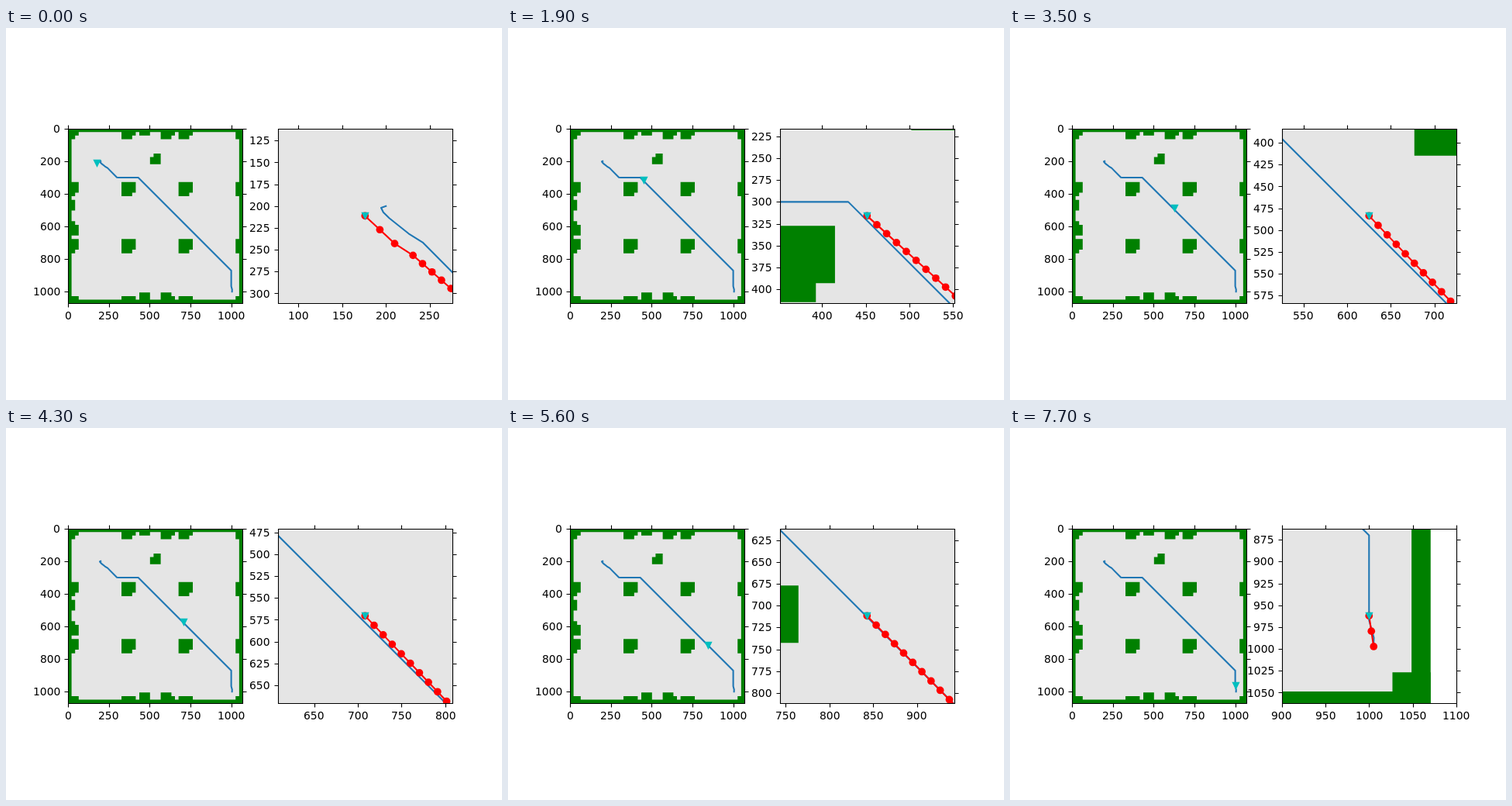
Animation of 640 by 480 pixels, one loop 7800 ms. Source, as an HTML page with a canvas:

```html
<!DOCTYPE html>
<html>
<head>
<meta charset="utf-8">
<style>
html, body { margin: 0; width: 100%; height: 100%; overflow: hidden; background: #fff; }
canvas { display: block; }
</style>
</head>
<body>
<canvas id="stage" width="640" height="480"></canvas>
<script>
const ctx = document.getElementById('stage').getContext('2d');
const SIZE = 225.45, TOP = 129.67, WORLD = 1071, CELLS = 49, CELL = WORLD / CELLS;
const STEP = 100, STEPS = 78;

// Obstacles in grid cells: x, y, width, height.
// Notched pillars repeat every 16 cells; the map wraps from bottom to top.
const blocks = [[24, 7, 2, 3], [23, 8, 3, 2], [0, 20, 2, 3], [0, 26, 2, 4], [0, 27, 3, 3]];
for (let x = -1; x < CELLS; x += 16)
  for (let y = -1; y < CELLS; y += 16)
    blocks.push([x, y, 4, 3], [x, y, 3, 4]);
for (const y of [-2, 46])
  blocks.push([20, y, 3, 4], [26, y, 3, 5], [26, y + 1, 4, 3]);

const route = [
  [200, 200], [194.5, 202], [197, 207], [204, 214], [226, 231.5], [242, 241.5],
  [299, 299], [309, 300], [430, 300], [1000, 870], [1000, 967], [1005.5, 987], [1005, 1000]
];

// Vehicle waypoints: step, x, y
const waypoints = [
  [0, 176.1, 211.2], [2, 210, 242.9], [3, 231, 256.4], [7, 274.5, 294.4],
  [9, 303, 306.5], [11, 338.8, 305.9], [17, 429, 295.6], [28, 552.6, 407.7],
  [56, 843, 711.7], [71, 1000, 871.5], [77, 1000, 962.1], [79, 1005.3, 997.2]
];

function vehicleAt(step) {
  const n = Math.max(1, waypoints.findIndex(w => w[0] >= step));
  const [a, ax, ay] = waypoints[n - 1], [b, bx, by] = waypoints[n];
  const u = (step - a) / (b - a);
  return [ax + (bx - ax) * u, ay + (by - ay) * u];
}
const track = Array.from({ length: STEPS + 2 }, (_, i) => vehicleAt(i));

// Centre of the nearest pixel, for crisp thin lines
const snap = v => Math.floor(v + 0.5) + 0.5;

function polyline(points, color) {
  ctx.beginPath();
  points.forEach(p => ctx.lineTo(...p));
  ctx.strokeStyle = color;
  ctx.lineWidth = 2.08;
  ctx.lineJoin = 'round';
  ctx.lineCap = 'square';
  ctx.stroke();
}

function dot([x, y]) {
  ctx.beginPath();
  ctx.arc(x, y, 4.86, 0, 7);
  ctx.fillStyle = '#f00';
  ctx.fill();
}

function triangle(point) {
  const [x, y] = point.map(snap);
  ctx.beginPath();
  ctx.moveTo(x - 4, y - 4);
  ctx.lineTo(x + 4, y - 4);
  ctx.lineTo(x, y + 4);
  ctx.closePath();
  ctx.fillStyle = ctx.strokeStyle = '#00bfbf';
  ctx.lineWidth = 1.39;
  ctx.lineJoin = 'miter';
  ctx.fill();
  ctx.stroke();
}

function ticksIn(lo, span, step) {
  const list = [];
  for (let v = Math.ceil(lo / step) * step; v <= lo + span; v += step) list.push(v);
  return list;
}

// Draws text so that the given fraction of its width lies left of x
function label(text, x, y, align) {
  ctx.fillText(text, Math.round(x - ctx.measureText(text).width * align), y);
}

function drawAxes(left, x0, y0, span, stepX, stepY, toPx) {
  const [l, r, t, b] = [left, left + SIZE, TOP, TOP + SIZE].map(snap);
  ctx.strokeStyle = ctx.fillStyle = '#000';
  ctx.lineWidth = 1.11;
  ctx.lineJoin = 'miter';
  ctx.lineCap = 'butt';
  ctx.font = '13.889px "DejaVu Sans", sans-serif';
  ctx.beginPath();
  ctx.rect(l, t, r - l, b - t);
  for (const v of ticksIn(x0, span, stepX)) {
    const px = toPx([v, y0])[0], x = snap(px);
    ctx.moveTo(x, t); ctx.lineTo(x, t - 5);
    ctx.moveTo(x, b); ctx.lineTo(x, b + 5);
    label(v, px, 376, 0.5);
  }
  for (const v of ticksIn(y0, span, stepY)) {
    const py = toPx([x0, v])[1], y = snap(py);
    ctx.moveTo(l, y); ctx.lineTo(l - 5, y);
    ctx.moveTo(r, y); ctx.lineTo(r + 5, y);
    label(v, left - 9.7, Math.round(py + 5.1), 1);
  }
  ctx.stroke();
}

function panel(left, x0, y0, span, stepX, stepY, vehicle, plan = []) {
  const k = SIZE / span;
  const toPx = ([x, y]) => [left + (x - x0) * k, TOP + (y - y0) * k];
  const fillCells = (color, cells) => {
    ctx.beginPath();
    for (const [x, y, w, h] of cells)
      ctx.rect(...toPx([x * CELL - 0.5, y * CELL - 0.5]), w * CELL * k, h * CELL * k);
    ctx.fillStyle = color;
    ctx.fill();
  };
  ctx.save();
  ctx.beginPath();
  ctx.rect(Math.round(left), 130, 225, 225);
  ctx.clip();
  fillCells('#008000', [[0, 0, CELLS, CELLS]]);
  fillCells('#e5e5e5', [[1, 1, CELLS - 2, CELLS - 2]]);
  // Blocks crossing the border must not spill outside the map
  ctx.beginPath();
  ctx.rect(...toPx([-0.5, -0.5]), WORLD * k, WORLD * k);
  ctx.save();
  ctx.clip();
  fillCells('#008000', blocks);
  ctx.restore();

  const points = plan.map(toPx);
  polyline(route.map(toPx), '#1f77b4');
  polyline(points, '#f00');
  points.forEach(dot);
  triangle(toPx(vehicle));
  ctx.restore();
  drawAxes(left, x0, y0, span, stepX, stepY, toPx);
}

function draw(time) {
  const step = Math.floor(time / STEP) % STEPS;
  const vehicle = track[step];
  ctx.fillStyle = '#fff';
  ctx.fillRect(0, 0, 640, 480);
  panel(80, -0.5, -0.5, WORLD, 250, 200, vehicle);
  panel(350.55, vehicle[0] - 100, vehicle[1] - 100, 200, 50, 25, vehicle, track.slice(step));
}

const start = performance.now();
function tick() {
  draw(performance.now() - start);
  requestAnimationFrame(tick);
}
tick();
</script>
</body>
</html>
```
